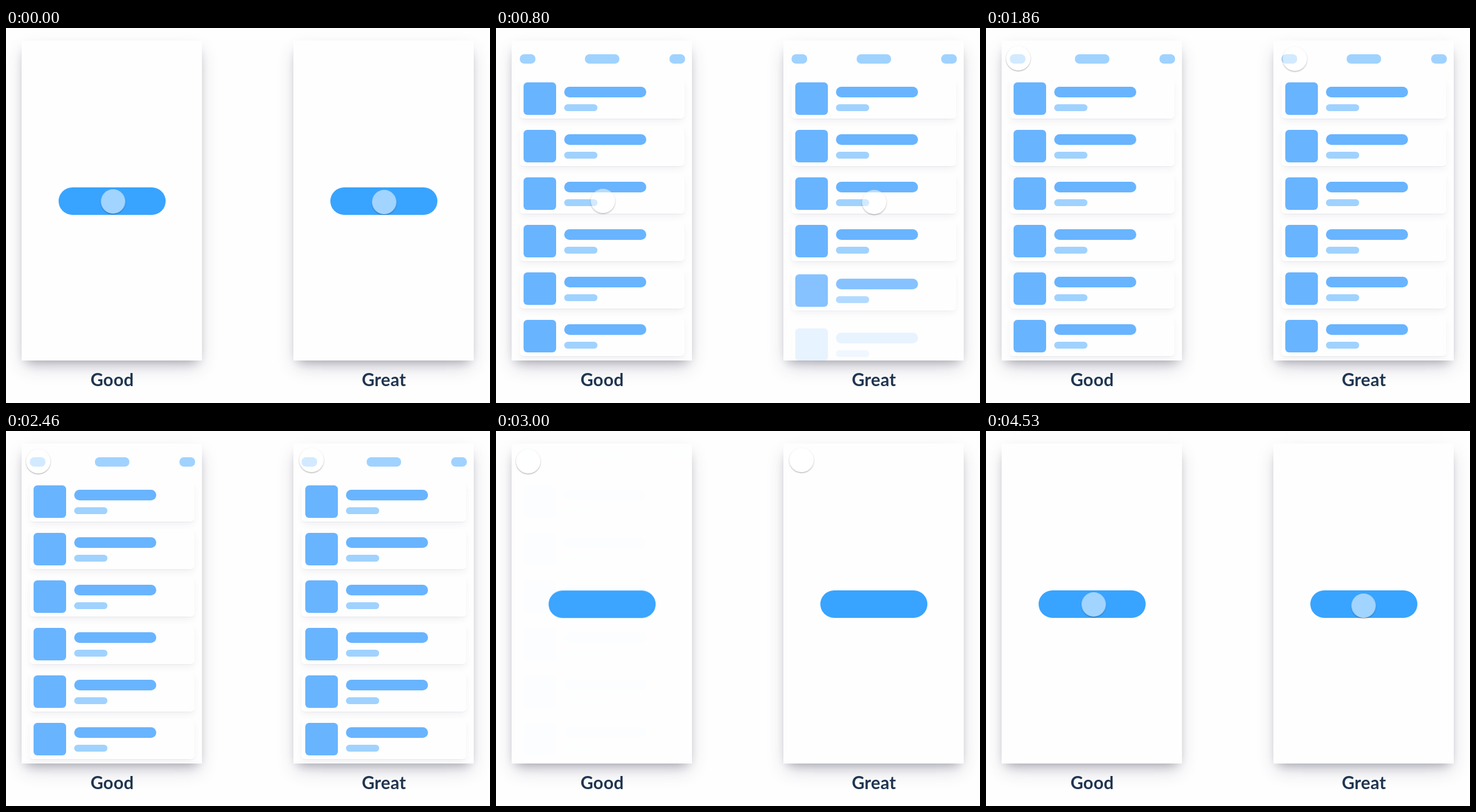
These frames come from a looping animation (773x600 px, 4660 ms). An HTML page:

```html
<!DOCTYPE html>
<html lang="en">
<head>
<meta charset="utf-8">
<title>Good and great transitions</title>
<style>
  html, body { margin: 0; width: 100%; height: 100%; overflow: hidden; background: #fefefe; }
  .stage { position: relative; width: 773px; height: 600px; overflow: hidden; }
  .stage * { position: absolute; box-sizing: border-box; }

  .side { top: 20px; width: 288px; height: 512px; }
  .good { left: 25px; }
  .great { left: 459px; }
  .screen {
    inset: 0; overflow: hidden; background: #fefefe;
    box-shadow: 0 13px 27px -5px rgba(50, 50, 93, .25), 0 8px 16px -8px rgba(0, 0, 0, .3);
  }
  .label {
    top: 528px; width: 289px; margin: 0; text-align: center;
    font: 700 28px/28px Lato, sans-serif; letter-spacing: .2px; color: #1f3550;
  }

  .nav, .list { inset: 0; }
  .nav i { top: 22px; width: 25px; height: 14.5px; border-radius: 7px; background: #a0d2ff; }
  .nav i:nth-child(1) { left: 13px; }
  .nav i:nth-child(2) { left: 117px; width: 55px; }
  .nav i:nth-child(3) { left: 252px; }

  .row {
    left: 13px; top: calc(61px + var(--i) * 75.9px); width: 263px; height: 64px;
    border-radius: 5px; background: #fefefe;
    box-shadow: 0 6px 12px -2px rgba(50, 50, 93, .07), 0 1px 2px rgba(0, 0, 0, .05);
  }
  .thumb { left: 6px; top: 6px; width: 52px; height: 52px; border-radius: 6px; background: #69b4ff; }
  .name { left: 71px; top: 13px; width: 131px; height: 17px; border-radius: 9px; background: #69b4ff; }
  .note { left: 71px; top: 41px; width: 53px; height: 11px; border-radius: 6px; background: #a0d2ff; }

  .button { left: 58.5px; top: 235px; width: 171.5px; height: 44px; border-radius: 22px; background: #38a4ff; }
  .cursor {
    left: -19.5px; top: -19.5px; width: 39px; height: 39px; border-radius: 50%;
    background: rgba(255, 255, 255, .53); box-shadow: 0 1px 2px rgba(0, 0, 0, .36);
  }

  .nav, .list, .row, .button { animation: 4660ms ease-in-out infinite both; }
  .nav { --from: -13px; --to: -13px; }
  .list { --from: 16px; --to: 0px; }

  /* Good: everything moves as one */
  .good .nav, .good .list { animation-name: good-view; }
  .good .button { animation-name: good-button; }
  @keyframes good-view {
    0%, 1.29% { opacity: 0; translate: 0 var(--from); }
    12.88%, 55.15% { opacity: 1; translate: 0 0; }
    65.24%, 100% { opacity: 0; translate: 0 var(--to); }
  }
  @keyframes good-button {
    0%, 1.29% { opacity: 1; translate: 0 0; }
    12.88%, 55.15% { opacity: 0; translate: 0 16px; }
    65.24%, 100% { opacity: 1; translate: 0 0; }
  }

  /* Great: quicker, with staggered rows */
  .great .nav { animation-name: great-nav; }
  .great .list { animation-name: great-list; }
  .great .row { animation-name: great-row; animation-delay: calc(180ms + var(--i) * 110ms); }
  .great .button { animation-name: great-button; }
  @keyframes great-nav {
    0%, 3.43% { opacity: 0; translate: 0 var(--from); }
    9.01%, 53.43% { opacity: 1; translate: 0 0; }
    61.37%, 100% { opacity: 0; translate: 0 var(--to); }
  }
  @keyframes great-list {
    0%, 53.43% { opacity: 1; }
    61.37%, 100% { opacity: 0; }
  }
  @keyframes great-row {
    0% { opacity: 0; translate: 0 16px; }
    5.58%, 80% { opacity: 1; translate: 0 0; }
    80.01%, 100% { opacity: 0; translate: 0 16px; }
  }
  @keyframes great-button {
    0%, 1.29% { opacity: 1; translate: 0 0; }
    9.66%, 53.43% { opacity: 0; translate: 0 16px; }
    62.02%, 100% { opacity: 1; translate: 0 0; }
  }

  /* Cursor: x and y run on separate tracks, which bends the path */
  .cursor { animation: 4660ms cubic-bezier(.65, 0, .35, 1) infinite; }
  .good .cursor { animation-name: good-x, good-y; }
  .great .cursor { animation-name: great-x, great-y; }
  @keyframes good-x {
    0%, 15.88% { translate: 145.5px 0; }
    40.34%, 69.96% { translate: 26px 0; }
    84.98%, 100% { translate: 146.5px 0; }
  }
  @keyframes good-y {
    0%, 15.67% { transform: translateY(257px); }
    39.91%, 69.96% { transform: translateY(28px); }
    84.98%, 100% { transform: translateY(257px); }
  }
  @keyframes great-x {
    0%, 20.52% { translate: 144.5px 0; }
    44.98%, 69.96% { translate: 28.5px 0; }
    85.15%, 100% { translate: 143.5px 0; }
  }
  @keyframes great-y {
    0%, 19.61% { transform: translateY(258px); }
    44.08% { transform: translateY(22px); }
    48.07%, 69.96% { transform: translateY(26px); }
    86.91%, 100% { transform: translateY(259px); }
  }
</style>
</head>
<body>
<div class="stage"></div>
<script>
  const row = (_, i) => `
    <div class="row" style="--i:${i}">
      <i class="thumb"></i><i class="name"></i><i class="note"></i>
    </div>`;

  const side = label => `
    <section class="side ${label.toLowerCase()}">
      <div class="screen">
        <div class="nav"><i></i><i></i><i></i></div>
        <div class="list">${Array.from({ length: 6 }, row).join('')}</div>
        <div class="button"></div>
      </div>
      <p class="label">${label}</p>
      <div class="cursor"></div>
    </section>`;

  document.querySelector('.stage').innerHTML = ['Good', 'Great'].map(side).join('');
</script>
</body>
</html>
```
